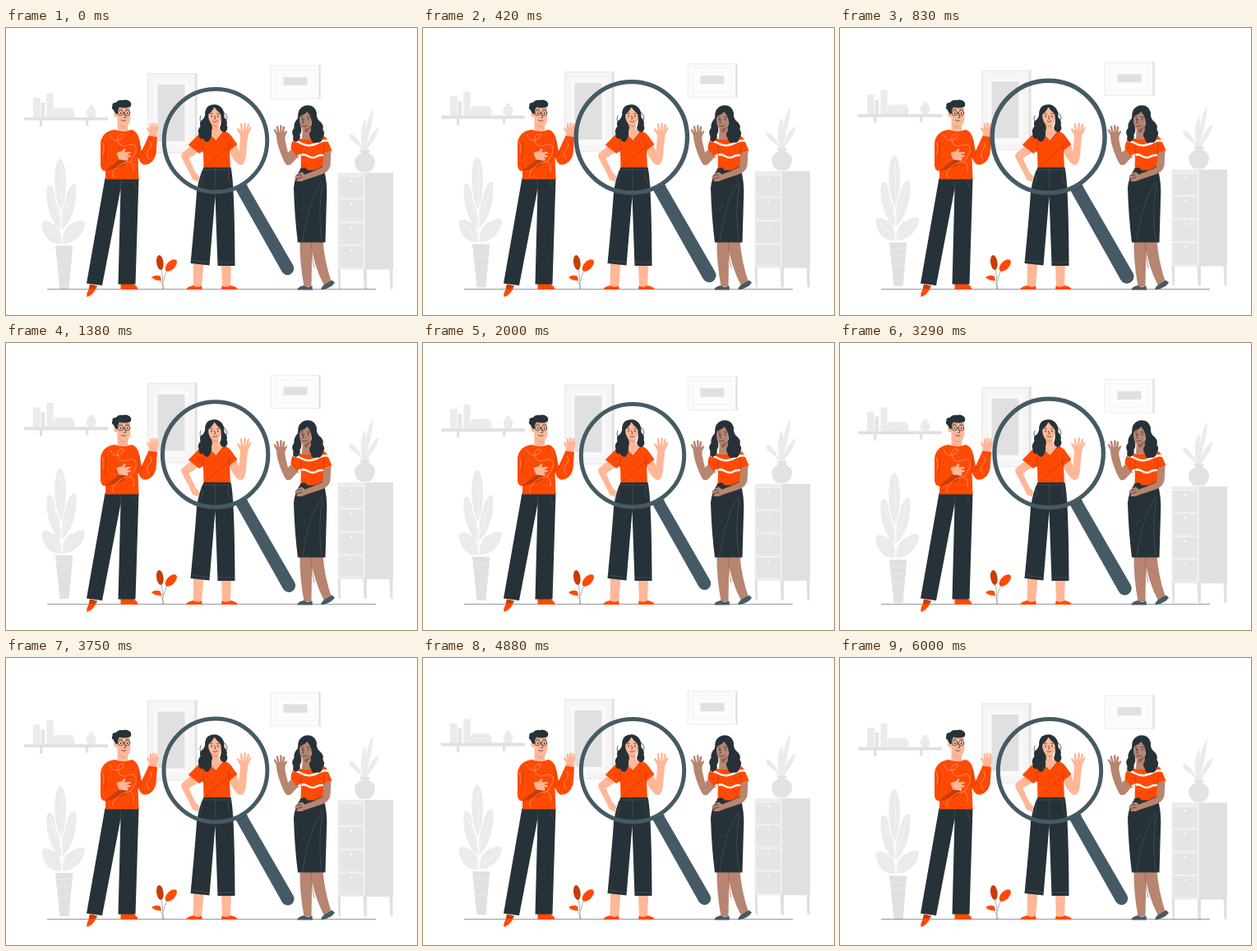
Animation, 500 px wide and 350 px high, one loop 6040 ms. Source, as an HTML page:

```html
<!DOCTYPE html>
<html lang="en">
<head>
<meta charset="utf-8">
<title>Under the magnifying glass</title>
<style>
html, body { margin: 0; width: 100%; height: 100%; overflow: hidden; background: #fff; }
svg { display: block; width: 100vw; height: 100vh; }
.g1 { fill: #e0e0e0; }
.g2 { fill: #ebebeb; }
.g3 { fill: #f5f5f5; }
.w { fill: #fff; }
.or { fill: #ff4a03; }
.od { fill: #c93c05; }
.dk { fill: #263238; }
.st { fill: #455a64; }
.sk { fill: #ffb798; }
.sd { fill: #b78570; }
.line { fill: none; stroke-width: .7; stroke-linecap: round; stroke-linejoin: round; }
.fold { stroke: #b93806; }
.seam { stroke: #50626b; stroke-width: .5; }
.ink { stroke: #263238; }
.pale { stroke: #ffa486; }
.fingers { fill: none; stroke-width: 2.5; stroke-linecap: round; }
</style>
</head>
<body>
<svg viewBox="0 0 500 350">
  <defs>
    <g id="drawer">
      <rect x="406" y="0" width="29" height="25.5" fill="#e5e5e5"/>
      <path d="M405.500 0H435.500V25.500" fill="none" stroke="#f7f7f7" stroke-width="1"/>
      <circle class="w" cx="420" cy="5.5" r="1.2"/>
    </g>
  </defs>

  <g id="room">
    <rect class="g2" x="172" y="55" width="59" height="98"/>
    <rect class="g1" x="230" y="55" width="2.6" height="98"/>
    <rect class="g3" x="173.5" y="56.5" width="56" height="95"/>
    <rect class="w" x="180" y="64" width="42" height="80" opacity=".4"/>
    <rect class="g1" x="184.5" y="69" width="33" height="69"/>

    <rect class="g2" x="321.7" y="45.3" width="60" height="41.4"/>
    <rect class="g1" x="380.5" y="45.3" width="2.2" height="41.4"/>
    <rect x="322.7" y="46.3" width="57.5" height="39.4" fill="#fcfcfc"/>
    <path class="line" d="M328 80V51H347M328 80H376V51H350" stroke="#efefef"/>
    <rect class="g1" x="337.5" y="60" width="29" height="10.2"/>

    <path class="g2" d="M33 85H41.7V109H33ZM49.3 79.5H57.6V109H49.3ZM59 97.5H81.5V101H83.5V109H57.5V101H59Z"/>
    <path d="M42.5 91H47.3V109H42.5Z" fill="#e5e5e5"/>
    <path class="g2" d="M101 94H106.5V97Q110 99 109.5 104Q109 108 106 109H101.5Q98 107 97.5 103Q97.5 99 101 97Z"/>
    <path class="g1" d="M22 108.8H124V112.6H22ZM41 112H44.2V120H41ZM97 112H100.2V119H97Z"/>

    <g class="g2">
      <path d="M66.500 222C56 202 58 161 66 159.500C74 161 76 202 67.500 222Z"/>
      <path d="M67 246C52 236 47 206 50.500 193C56 188 60 200 60 210C63 218 67 222 67 246Z"/>
      <path d="M68 246C67 222 71 215 73 208C74 198 80 187 85 191C87 206 83 234 68 246Z"/>
      <path d="M67 263C53 265 44 252 43.500 239C47 231 56 239 60 240C65 244 68 253 67 263Z"/>
      <path d="M68.500 263C68 253 72 244 77 240C83 238 90 232 96 236C96 250 83 264 68.500 263Z"/>
    </g>
    <path class="line" d="M67 166L69 266M53 197L68 240L82 195M48 240L69 263L92 239" stroke="#f6f6f6"/>
    <path class="g1" d="M60 265.500H81.300L76.500 318.500H65.500Z"/>
    <path class="line" d="M61 273Q70 276 80.500 272M62 281Q70 284 80 280M63 294Q70 296 79 292" stroke="#efefef"/>

    <path class="g2" d="M434 150C428 139 416 138 417.500 129C424 128 430 139 435.500 150ZM434.500 150C430 135 431 121 437 111C439.500 121 435 136 436 150ZM435.500 150C436 128 439 111 446.500 98C447.500 112 440 136 437 150ZM437 150C440 134 447 125 453.500 121C453 132 443 142 438.500 150Z"/>
    <path d="M430.500 148.500H442.500V151H441.500V153Q449 156 449 163Q448 172 442 175.500H431Q425 172 424 163Q424.500 156 432 153V151H430.500Z" fill="#e2e2e2"/>
    <path class="g1" d="M403.500 294H407V318.500H404.500ZM434.500 294H439V318.500H435.500ZM466.500 294H470.500V318.500H467.500Z"/>
    <rect class="g2" x="403.500" y="176.500" width="34" height="118"/>
    <rect class="g1" x="437" y="176.500" width="34" height="118"/>
    <use href="#drawer" y="181"/>
    <use href="#drawer" y="209"/>
    <use href="#drawer" y="237.500"/>
    <use href="#drawer" y="265.500"/>
  </g>

  <path d="M50 318.500H450" stroke="#263238" stroke-width=".5"/>

  <g id="sprout">
    <path class="line seam" d="M191 318C191 305 190 298 187.500 287M191.500 309Q193 298 201 288M191.500 318Q191 308 183 304.500"/>
    <ellipse class="od" cx="187.300" cy="286" rx="4.200" ry="9" transform="rotate(-8 187.300 286)"/>
    <ellipse class="or" cx="200.800" cy="289.500" rx="4.900" ry="9" transform="rotate(44 200.800 289.500)"/>
    <path class="or" d="M189 308Q181 308.500 177 304Q183 300 188 303Z"/>
  </g>

  <g id="man">
    <path class="or" d="M102 312.500L111 314.500L109 319Q105 326 98.500 328Q97.500 324 100.500 319ZM139.500 311.500H154Q160.500 315 160.500 319H139.500Z"/>
    <path class="od" d="M102 312.500L111 314.500L107 318L101 318Z"/>
    <path class="dk" d="M120.500 183H161.500L157.500 312.500H136.500L139.500 196L117 314L98 311.500Z"/>
    <path class="line seam" d="M139.500 187L139 200M155 187Q156 196 161 197"/>
    <path class="sk" d="M173.500 133L175 121H184.500L183.500 134Z"/>
    <path class="fingers" stroke="#ffb798" d="M176 128L172.300 122.500M176.500 125L176 117.500M179 124L179.500 116.500M181.500 125L183 117.500M183 127L184.500 121"/>
    <path class="or" d="M132 124Q143 127 153 124Q160 126 162 136L165 150L173.500 131.500L184 133L182.500 154Q178 168 167 166.500Q163 165 160.500 157L161.500 184.500H121V174.500Q114 174 115 164V140Q117 126 132 124Z"/>
    <path class="od" d="M121.500 164L137 154L149 160L143 168L122 174.500Z"/>
    <path class="or" d="M115.500 160L119 162L135.500 151.500L138.500 160L122 173Q114 176 115.500 160Z"/>
    <path class="sk" d="M134.500 152.500Q138 150 141 150.500L143.500 147L145.500 148L144 151.500L151.500 151L152 152.500L147 154.500L152 155.500L151 157.500L147 157.500L149 159.500L147.500 162L142 161L137.500 160.500Z"/>
    <path class="line fold" d="M122 139L120.500 160M162 137L160.500 158M166 150L164 156"/>
    <path class="line pale" d="M126 130Q130 140 139 136Q147 130 141 129Q133 131 137 140Q141 147 151 142Q160 141 158 151Q155 158 151 163Q142 163 134 171Q127 177 131 182M151 163Q157 166 155 175M175 138Q179 143 174 148T174 160M117 140Q121 147 118 153"/>
    <path class="sk" d="M135.500 108H148.500L148 125Q143 128 135.500 124Z"/>
    <path class="sk" d="M134 97Q143 92 151 97L151.500 110Q150.500 120 144 120.500Q137 119 135.500 109Q131 109 131 104.500Q132 102 134 103.500Z"/>
    <path d="M138 116.500Q141 121 146 120.500Q141 123 138 116.500Z" fill="#f28f75"/>
    <path class="dk" d="M134 105Q131 102 131 100Q127.500 98 129.500 95Q128.500 91 133.500 91Q137 87 142 88Q147 86.500 150.500 89.500Q153.500 92 151.500 96Q146 98.500 138 96.500Q136 99 135.500 105Z"/>
    <g class="line ink"><circle cx="139.500" cy="103.700" r="3.200"/><circle cx="147.500" cy="103.700" r="3.200"/><path d="M142.700 103.500H144.300M136.300 103L133.500 102.500M137.500 99.200Q139.500 98 141.500 99.200M146 99.200Q148 98 149.500 99.500M144 105L146 109L143.500 109.500M140.500 112.500Q143 114.500 146 112.800"/></g>
    <path class="dk" d="M139 103H140.200V105H139ZM147 103H148.200V105H147Z"/>
  </g>

  <g id="woman">
    <path class="sk" d="M228 286H240.500L238 316H227.500ZM262 288H274L273 316H263Z"/>
    <path class="or" d="M227.500 314Q233 317 238 314.500L239 319H219Q220 315.500 227.500 314ZM262.500 314.500Q268 317 273.500 314Q281 315.500 282 319H262Z"/>
    <path class="sk" d="M226 143L214.500 152.500Q212 155 214 159L223 176L227 185L234 187.500L235 181L230.500 176L222.500 159L236 150Z"/>
    <path class="sk" d="M270 147L279 140L283.500 150L285 132L283.500 125L295 125L292.500 148Q292 167.500 285.500 167Q279 167 270 147Z"/>
    <path class="fingers" stroke="#ffb798" d="M285.500 129L282.300 123.500M287 126L286 117.500M290 125L290.800 116.500M293 126L294.800 118M294 129L297.200 122"/>
    <path class="sk" d="M248.500 112H259V124L266 127L256 146L241 127L248.500 125Z"/>
    <path class="or" d="M242 126L255.500 137.500L265 125.500Q271 127 274 131.500L281.500 142L272 149.500L273 171.500H240.500L240 150L235 153L221.800 142.500L233 131Q237 127 242 126Z"/>
    <path class="line fold" d="M265 126L255.500 137.500L246 128M270 138L272 150M240 139V151M274 142L244 168"/>
    <path class="dk" d="M240.500 170H273.500Q278 188 278.500 290H257.500L254.500 205L247.500 289.500L224.500 287Q230 230 232 200Q235 180 240.500 170Z"/>
    <path class="line seam" d="M254.500 172L255 205M238 177Q241 187 235 191M271 175Q268 188 277 193M240 173H274M226 283L247 286M258 286H278"/>
    <path class="sk" d="M245.500 102Q251 100 253 95.500Q256 100 262 102.500L261.500 111Q260 119.500 254.500 119.500Q247 117 245.500 109Z"/>
    <path d="M249 115Q252 119.500 257 119V121Q252 121 249 115Z" fill="#f28f75"/>
    <path class="dk" d="M242 107Q241.500 96 249 94Q257 91.500 262 97Q266 101 265.500 109Q270 113 268.500 118Q271 124 266.500 127Q261 127 260 122Q262.500 116 261.500 109Q262 104 257 101L253.500 96.500Q250 103 246.500 105Q245.500 110 248.500 115Q252.500 121 250 126Q251 134 246 138.500Q243 140 240 135Q234 136 234.500 130Q232.500 124 236.500 120Q234.500 114 240 111Z"/>
    <path class="line ink" d="M248.500 104.500Q250 103.200 251.500 104.500M256.500 104.500Q258 103.200 259.500 104.500M253.500 107L255 110.500L253.500 111M252 114Q254.500 115.500 257 113.500"/>
    <path class="dk" d="M249.500 106.500H250.700V108.500H249.500ZM257.300 106.500H258.500V108.500H257.300Z"/>
    <path class="line ink" d="M237 107Q234.500 112 238 116M265 103Q270.500 107 268.500 112"/>
  </g>

  <g id="friend">
    <path class="sd" d="M357.500 258H372.500L371.500 315H362.500Q357 285 357.500 258ZM370 258H385.500Q387 283 396 310L387.500 315Q374 290 370 258Z"/>
    <path class="line" d="M371.500 262Q371.500 280 375 292" stroke="#935f4e"/>
    <path class="st" d="M362 314Q367 317 372.500 314.500L373 319.500H354.500Q354 316 362 314ZM386.500 313.500L396.500 307.500L400 310.500Q396 317 384 319.500Q382 318 386.500 313.500Z"/>
    <path class="sd" d="M328.500 127H339.500L339.500 137L343 152L349 146L356 156L347 166Q342 169.500 339 164Q332 150 329.500 137Z"/>
    <path class="fingers" stroke="#b78570" d="M330 130L327 124.500M331.500 128L330 120.500M334.500 127L334.300 119.500M337 128L338 121M338.500 131L341 126.500"/>
    <path class="dk" d="M359 171H386Q391.500 186 390 210L388.500 261.500H355Q351 230 350 195Q351 182 359 171Z"/>
    <path class="line seam" d="M384 187Q373 205 368 225Q363 245 361 260M366 215L360 222M385 190Q379 225 384 259"/>
    <path class="sd" d="M361 118H371V133L376 136L367 140L360 135Z"/>
    <path class="or" d="M359 135Q367 138 375 133.500Q387 128 391 136.500L396.500 149.500L387 153L386 173.500H358.500L359 155L355 158.500L346.500 147Q347 138 351 135.500Q355 134 359 135Z"/>
    <path d="M350 137.500Q355 138 360 141T371 143T382 139T393 138M355 156.500Q361 152.500 367 156T377 157T386 155" fill="none" stroke="#fff" stroke-width="2.500"/>
    <path class="line fold" d="M387 142L386 154M359 144V156"/>
    <path class="dk" d="M357 172L363 170L367 173L362 176Z"/>
    <path class="sd" d="M387 153L395.500 149.500L394.500 168Q392 176 384 178.500L363 185.500L361 180L385 169Z"/>
    <path class="sd" d="M364 179L360 175.500L356 177L352 180L351.500 183L354 184L353.500 187L360 187L366 184Z"/>
    <path class="line ink" d="M354 179.500L359 179M354 183.500L360 182M385 169.500L370 176"/>
    <path class="sd" d="M357 106Q363 102 366 100Q372 105 373 111L371 118Q368 125 363 124.500Q358 122.500 357 115Z"/>
    <path d="M362.500 124Q367 123 370 119.500Q369 126 364 128Z" fill="#935f4e"/>
    <path class="dk" d="M355 110Q354.500 97 364 94.500Q375 92.500 378 103Q377 110 382 114Q387 118 385.500 124Q389 129 385 134Q384 141 378 139.500Q372 142 371 135Q367 130 371 125Q370 121 372 116Q372 109 366.500 102Q363 106 358 107.500Q356 112 358 118Q361 126 357.500 130Q359 136 353 139Q348 139 349.500 132Q346.500 126 350.500 122Q349.500 116 355 110Z"/>
    <path class="line ink" d="M359 108.500Q360 107.500 361.500 108.500M366 108.500Q368 107.300 369.500 109M362.500 111L361 115.500L362.500 116M361 119.500Q364 121 366.500 119"/>
    <path class="dk" d="M360 110.500H361.200V112.500H360ZM367 110.500H368.200V112.500H367Z"/>
  </g>

  <g id="glass">
    <path class="st" d="M278.800 196L292 190L349.300 289.500A7.800 7.800 0 0 1 335.500 297Z"/>
    <circle cx="255" cy="137.200" r="62.700" fill="none" stroke="#455a64" stroke-width="5"/>
    <path d="M282 198L294 191.500" stroke="#37474f" stroke-width=".7"/>
  </g>
</svg>
<script>
const LOOP = 6040, FLOAT = 3000, DRIFT = 7;
const RISE = 660, FALL = 1130, PULSES = [-40, 2110, LOOP - 40];
const room = document.getElementById("room");
const glass = document.getElementById("glass");
const ease = x => (1 - Math.cos(Math.PI * x)) / 2;

// One swell: a quick growth, then a slower return.
function pulse(t) {
  if (t <= 0 || t >= RISE + FALL) return 0;
  return t < RISE ? ease(t / RISE) : 1 - ease((t - RISE) / FALL);
}

function draw(now) {
  const t = now % LOOP;
  const phase = t % FLOAT / FLOAT;
  const lift = DRIFT * (1 - Math.abs(1 - 2 * phase));
  room.setAttribute("transform", `translate(0 ${-lift})`);

  const scale = 1 + 0.1 * PULSES.reduce((sum, start) => sum + pulse(t - start), 0);
  glass.setAttribute("transform", `translate(270 186.5) scale(${scale}) translate(-270 -186.5)`);
  requestAnimationFrame(draw);
}
draw(performance.now());
</script>
</body>
</html>
```
